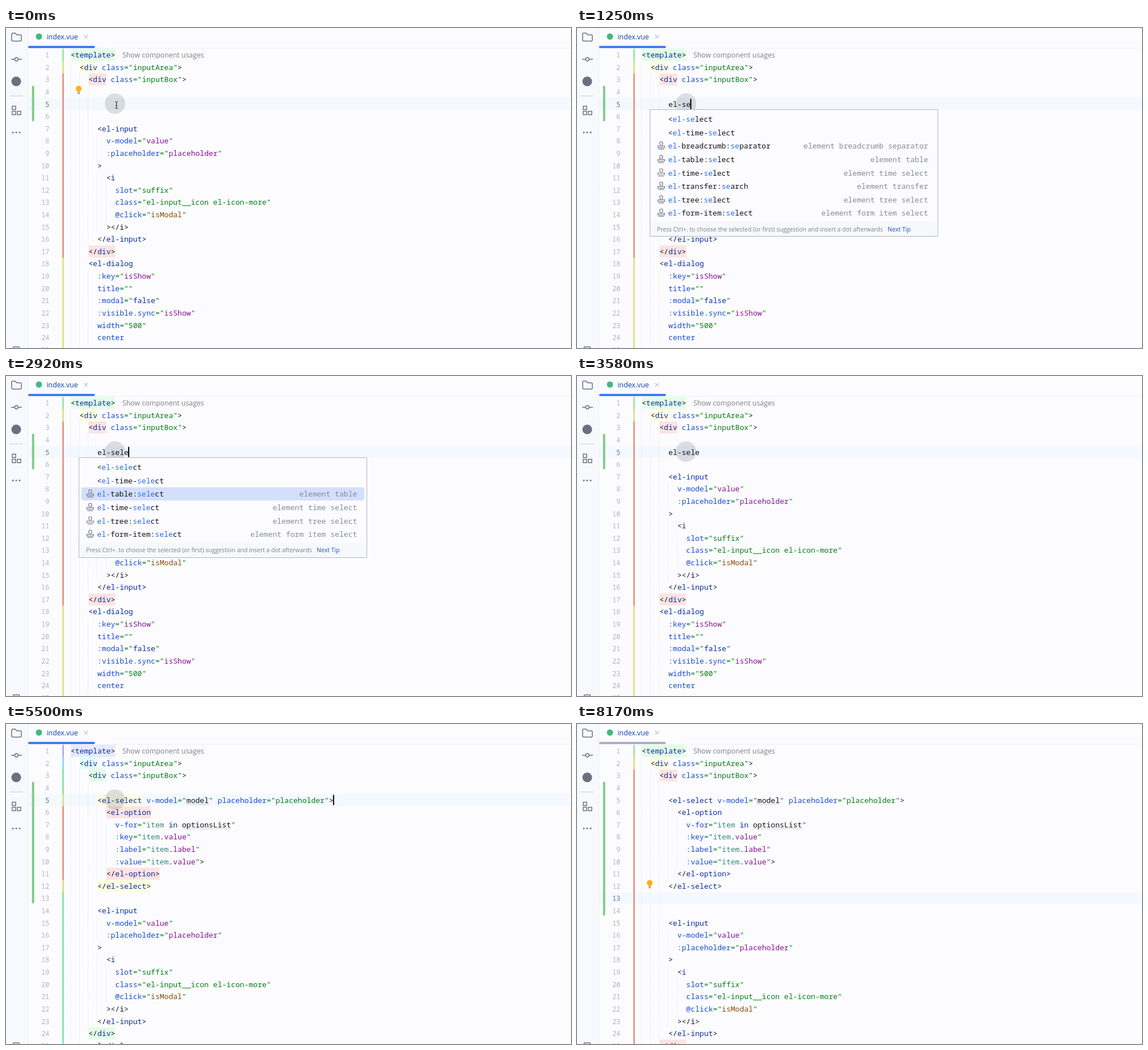
Animation of 995 by 563 pixels, one loop 8330 ms. Source, as an HTML page with a canvas:

```html
<!DOCTYPE html>
<html lang="en">
<head>
<meta charset="utf-8">
<title>Editor completion</title>
<style>
  html, body { margin: 0; width: 100%; height: 100%; overflow: hidden; background: #fcfcfe; }
  canvas { display: block; }
</style>
</head>
<body>
<canvas id="stage" width="995" height="563"></canvas>
<script>
const LOOP = 8330, X0 = 113.9, CW = 7.843, ROW = 21.61;
const MONO = '13.07px "Noto Sans Mono", monospace';
const SMALL_MONO = '11.8px "Noto Sans Mono", monospace';
const ui = size => `${size}px "Open Sans", sans-serif`;
const ctx = document.getElementById('stage').getContext('2d');

const BLACK = '#111318', NAVY = '#0a2f9c', ATTR = '#174ad4', GREEN = '#067d17', PURPLE = '#871094', TEAL = '#35887a';
const ICON = '#6c707e', SOFT = '#7c808c';
const NAMES = { item: TEAL, in: NAVY, false: NAVY, value: PURPLE, label: PURPLE, placeholder: PURPLE, isShow: PURPLE, isModal: '#8a4b08' };
const TINTS = ['#fde3e3', '#fdfde2', '#e3fee7', '#e1fcfd', '#e6e9fe'];
const STRIPES = ['#ee8c8c', '#e6e384', '#8be69b', '#8ae3ec', '#99a6f2'];

const HEAD = ['<template>', '  <div class="inputArea">', '    <div class="inputBox">', ''];
const BLOCK = `
      <el-select v-model="model" placeholder="placeholder">
        <el-option
          v-for="item in optionsList"
          :key="item.value"
          :label="item.label"
          :value="item.value">
        </el-option>
      </el-select>`.split('\n').slice(1);
const TAIL = `
      <el-input
        v-model="value"
        :placeholder="placeholder"
      >
        <i
          slot="suffix"
          class="el-input__icon el-icon-more"
          @click="isModal"
        ></i>
      </el-input>
    </div>
    <el-dialog
      :key="isShow"
      title=""
      :modal="false"
      :visible.sync="isShow"
      width="500"
      center
    >`.split('\n').slice(1);

const ITEMS = ['<el-select', '<el-time-select', 'el-select|element select',
  'el-breadcrumb:separator|element breadcrumb separator', 'el-table:select|element table',
  'el-time-select|element time select', 'el-transfer:search|element transfer',
  'el-tree:select|element tree select', 'el-form-item:select|element form item select',
  'el-switch|element switch', 'el-steps|element steps', 'el-slider|element slider'];

// Each schedule lists [start in ms, value].
const TYPED = [[0, ''], [170, 'e'], [500, 'el'], [1000, 'el-'], [1170, 'el-s'], [1250, 'el-se'], [1420, 'el-sel'], [1580, 'el-sele']];
const CARET = [[0, 0], [170, 1], [2330, 0], [2750, 1], [3250, 0], [3670, 1], [7330, 0], [7830, 1], [8170, 0]];
const PICKED = [[0, -1], [2250, 0], [2580, 1], [2920, 2]];
const FIELD = [[0, -1], [3670, 0], [4420, 1], [4830, 2], [5170, 3], [5500, -1]];
const FIELDS = [[5, 'model'], [5, 'placeholder'], [7, 'item'], [7, 'optionsList']];

const at = (t, steps) => steps.filter(s => s[0] <= t).pop()[1];
const rowY = row => 36.7 + (row - 1) * ROW;
const colX = col => X0 + col * CW;

function text(s, x, y, color, font = MONO, align = 'left') {
  ctx.font = font;
  ctx.fillStyle = color;
  ctx.textAlign = align;
  ctx.fillText(s, x, y);
}
function rect(x, y, w, h, color) {
  ctx.fillStyle = color;
  ctx.fillRect(x, y, w, h);
}
function round(x, y, w, h, r, color) {
  ctx.fillStyle = color;
  ctx.beginPath();
  ctx.roundRect(x, y, w, h, r);
  ctx.fill();
}
function dot(x, y, r, color) {
  ctx.fillStyle = color;
  ctx.beginPath();
  ctx.arc(x, y, r, 0, 7);
  ctx.fill();
}
function stroke(path, color, width = 1, dash = []) {
  ctx.strokeStyle = color;
  ctx.lineWidth = width;
  ctx.setLineDash(dash);
  ctx.stroke(new Path2D(path));
  ctx.setLineDash([]);
}

function drawFrame(t) {
  rect(0, 0, 995, 563, '#fcfcfe');
  rect(0, 0, 38, 563, '#f8f9fd');
  stroke('M38.5 0V563M39 35.5H995', '#eeeff4');
  stroke('M10 11q0-2 2-2h4l3 3h6q2 0 2 2v7q0 2-2 2h-13q-2 0-2-2z', ICON, 1.5);
  stroke('M9 55H15M21.5 55H28M21.3 55a3 3 0 1 1-6 0a3 3 0 1 1 6 0', ICON, 1.5);
  dot(18, 94, 8.5, ICON);
  stroke('M6 119.5H30', '#c9ccd6');
  stroke('M11 137.5h6v6h-6zM11 146.5h6v6h-6zM20 146.5h6v6h-6z', ICON, 1.5);
  for (const x of [12, 18, 24]) dot(x, 183.7, 1.5, ICON);
  stroke('M12.5 563v-1q0-1 1-1h9q1 0 1 1v1', ICON, 1.5);

  dot(58, 15, 5.5, '#41b883');
  text('index.vue', 71.5, 20, '#0b3fa8', ui(12.3));
  stroke('M137.5 12l6.5 6.5M144 12l-6.5 6.5', '#a0a3ad');
  round(39, 31.5, 117.5, 3.7, 2, t < 8170 ? '#3574f0' : '#a8adbd');
}

function drawTags(lines, levels) {
  levels.forEach(([first, last], i) => {
    const shade = levels.length - 1 - i;
    rect(99.3, rowY(first), 2.5, (last - first + 1) * ROW, STRIPES[shade]);
    for (const row of [first, last]) {
      const tag = /<\/?[\w-]+>?/.exec(lines[row - 1] || '');
      if (tag) rect(colX(tag.index), rowY(row), tag[0].length * CW, ROW - 0.5, TINTS[shade]);
    }
  });
}

function drawGuides(lines, innerReady) {
  lines.forEach((line, i) => {
    const depth = line ? line.search(/\S/) / 2 : 3;
    for (let d = 0; d < depth; d++) {
      if (d === 3 && i < 11 && !innerReady) continue;
      stroke(`M${Math.round(colX(d * 2)) - 0.5} ${rowY(i + 1)}v${ROW}`, '#e9e9f7', 1, [2, 1]);
    }
  });
}

function drawLine(line, y, resolved) {
  const put = (s, col, color) => text(s, colX(col), y, color);
  const pattern = /(<\/?)([a-z][\w-]*)|([@:\w.-]+)="([^"]*)"|[<>\/]+|[\w-]+/g;
  for (const m of line.matchAll(pattern)) {
    const [all, bracket, tag, attr, value] = m;
    const col = m.index;
    if (tag) {
      put(bracket, col, BLACK);
      put(tag, col + bracket.length, NAVY);
    } else if (attr) {
      const start = col + attr.length + 2;
      put(attr, col, ATTR);
      put('="', start - 2, GREEN);
      if (/^(:|@|v-)/.test(attr)) {
        const pending = !resolved && value.startsWith('item.');
        for (const w of value.matchAll(/\w+|\./g)) {
          put(w[0], start + w.index, pending ? BLACK : NAMES[w[0]] || BLACK);
        }
      } else put(value, start, GREEN);
      put('"', start + value.length, GREEN);
    } else put(all, col, all === 'center' ? ATTR : BLACK);
  }
}

function drawBulb(row) {
  const y = rowY(row) + 5.2;
  dot(128, y, 5, '#ffaf0f');
  rect(125.7, y + 3, 4.6, 2.5, '#ffaf0f');
  rect(125.7, y + 6.2, 4.6, 1.2, SOFT);
  rect(126.2, y + 8.2, 3.6, 1.2, SOFT);
}

function drawPopup(t, query) {
  const rest = query.slice(3);
  const items = rest ? ITEMS.filter(s => s.split('|')[0].includes(rest, 4)) : ITEMS;
  const pitch = 23.65, bottom = Math.min(148.5 + items.length * pitch + 29, 449.5);
  const footer = bottom - 26, picked = at(t, PICKED);
  rect(128.5, 143.5, 507, bottom - 143.5, '#fcfcff');
  ctx.save();
  ctx.beginPath();
  ctx.rect(129, 144, 506, footer - 144);
  ctx.clip();
  items.forEach((item, i) => {
    const [name, hint] = item.split('|');
    const y = 148.5 + i * pitch;
    if (i === picked) round(133, y, 498, 23.3, 4, '#d4dffd');
    const start = name.indexOf('el'), found = rest ? name.indexOf(rest, start + 3) : -1;
    const prefix = Math.min(query.length, 3);
    [...name].forEach((c, k) => {
      const hit = k >= start && k < start + prefix || found >= 0 && k >= found && k < found + rest.length;
      text(c, 160.4 + k * CW, y + 16.4, hit ? '#2d6be6' : BLACK);
    });
    if (!hint) return;
    text(hint, 618.3, y + 16.4, '#868a94', MONO, 'right');
    ctx.save();
    ctx.translate(148.3, y + 10.4);
    stroke('M-6 1.5H6V4.5H-6zM-5 7H5M-1.5 1.5V-1q-2-1.5-1-4q2.5-2 5 0q1 2.5-1 4V1.5', SOFT, 1.2);
    ctx.restore();
  });
  ctx.restore();
  rect(129, footer, 506, 26, '#f7f8fc');
  const y = bottom - 9;
  text('Press Ctrl+. to choose the selected (or first) suggestion and insert a dot afterwards', 140.7, y, SOFT, ui(10.45));
  text('Next Tip', 547, y, '#2450b8', ui(10.6));
  if (t >= 3420) stroke('M602 329.5a4 4 0 1 1-8 0a4 4 0 1 1 8 0', SOFT, 1.5, [1.5, 1.6]);
  stroke(`M128.5 143.5H635.5V${Math.floor(bottom) + 0.5}H128.5z`, '#b2b4bd');
}

function draw(t) {
  const expanded = t >= 3670, entered = t >= 5750;
  const query = at(t, TYPED), field = at(t, FIELD);
  const middle = expanded ? [...BLOCK, ''] : [query && '      ' + query, ''];
  if (entered) middle.push('');
  const lines = [...HEAD, ...middle, ...TAIL];
  const current = entered ? 13 : field >= 0 ? FIELDS[field][0] : 5;
  const levels = [[1, 99], [2, 98], [3, lines.indexOf('    </div>') + 1]];
  if (t >= 4170 && t < 6080) levels.push([5, 12]);
  if (t >= 5500 && t < 6080) levels.push([6, 11]);

  drawFrame(t);
  rect(39, rowY(current), 956, ROW - 0.4, '#f3f9ff');
  round(45.7, rowY(4), 4, (middle.length + 1) * ROW - 2, 2, '#80cb8c');
  drawGuides(lines, !expanded || t >= 3920);
  drawTags(lines, levels);

  const span = ([row, word]) => [colX(lines[row - 1].lastIndexOf(word)), rowY(row), word.length * CW];
  if (field >= 0) FIELDS.forEach((f, i) => {
    const [x, y, w] = span(f), active = i === field;
    rect(x - 0.5, y, w + 1, ROW - 1, active ? '#a6d2ff' : '#fefefe');
    stroke(`M${x - 0.5} ${y + 0.4}h${w + 1.5}v${ROW - 1.6}h${-w - 1.5}z`, active ? '#2d5f9e' : '#b9bab0');
  });
  if (t >= 4250 && t < 6080 || t >= 6670) for (const f of [FIELDS[0], FIELDS[3]]) {
    const [x, y, w] = span(f);
    stroke(`M${x} ${y + 18}h${w}`, '#b6b7c0', 1.2, [2, 1.5]);
  }

  lines.forEach((line, i) => {
    const y = rowY(i + 1) + 15.4;
    text(i + 1, 76.3, y, i + 1 === current ? ICON : '#aeb3c2', SMALL_MONO, 'right');
    drawLine(line, y, t >= 4000);
  });
  text('Show component usages', 205, 52, '#7d7f85', ui(12.35));

  if (t < 170) {
    drawBulb(4);
    stroke('M192 129.5q2.5 0 2.5 1.5q0-1.5 2.5-1.5M194.5 131V140M192 141.5q2.5 0 2.5-1.5q0 1.5 2.5 1.5M193 136.5h3', '#222');
  }
  if (t >= 7330) drawBulb(12);
  if (t < 6580) dot(192, 133, 18, 'rgba(60,65,85,.16)');

  if (at(t, CARET)) {
    let col = 6 + query.length;
    if (field >= 0) col = lines[current - 1].lastIndexOf(FIELDS[field][1]) + FIELDS[field][1].length;
    else if (entered) col = 6;
    else if (expanded) col = lines[4].length;
    rect(colX(col) - 0.8, rowY(current) + 1.5, 2, 18, '#000');
  }
  if (t >= 250 && t < 3580) drawPopup(t, query);
}

function tick(now) {
  draw(now % LOOP);
  requestAnimationFrame(tick);
}
requestAnimationFrame(tick);
</script>
</body>
</html>
```
